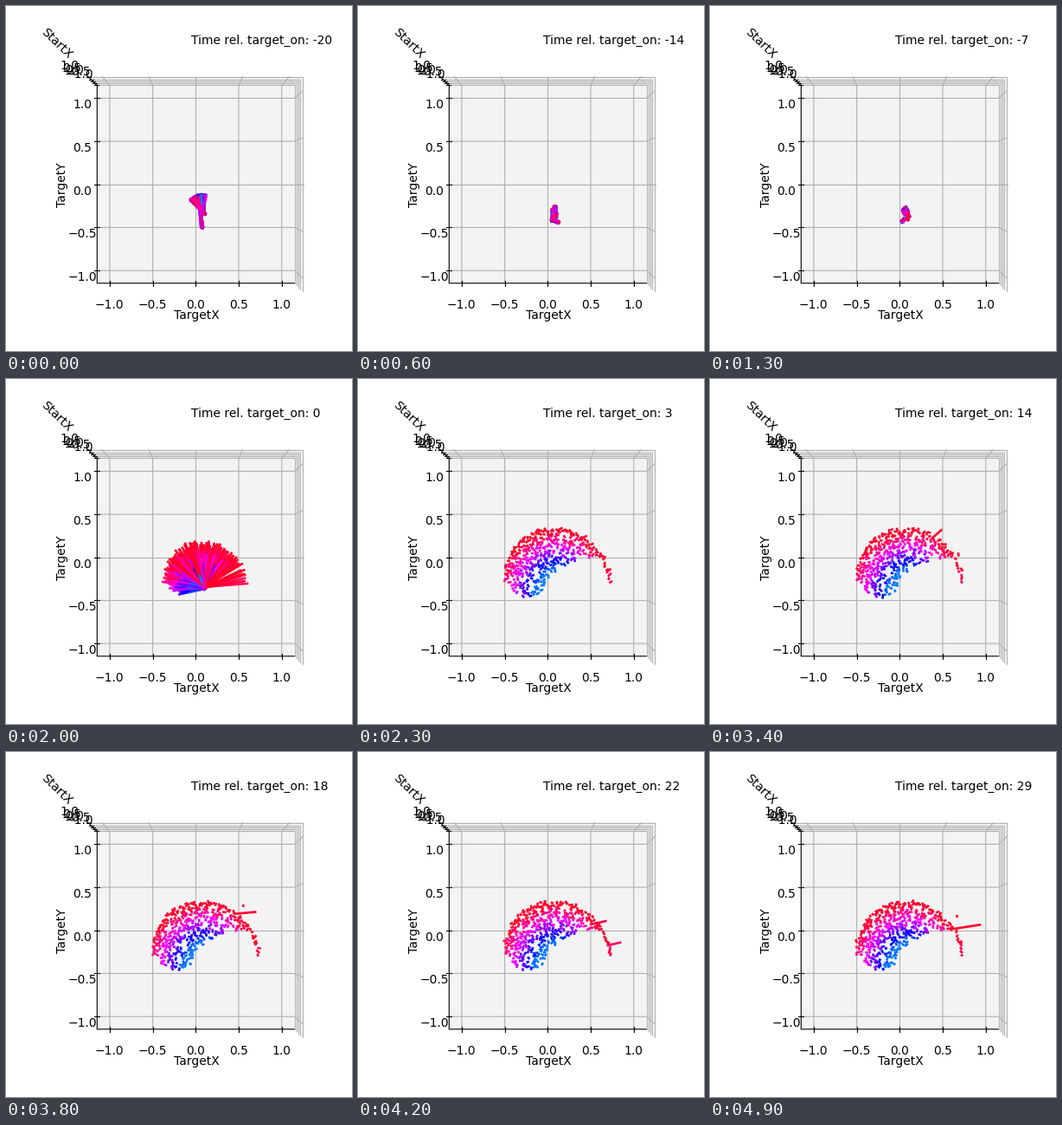
Animation, 400 px wide and 398 px high, one loop 5000 ms. Source, as a matplotlib script:

```python
import numpy as np
import matplotlib.pyplot as plt
from matplotlib.animation import FuncAnimation
from matplotlib.collections import LineCollection
from matplotlib.colors import hsv_to_rgb

W, H, DPI = 400, 398, 100
FRAMES, T0 = 50, -20
CX, CY, HALF, UNIT = 218.8, 205.3, 114, 99.4
E = HALF / UNIT
TICKS = np.linspace(-1, 1, 5)
HOME = np.array([228, 240])
rng = np.random.default_rng(8)

plt.rcParams["font.family"] = "DejaVu Sans"
plt.rcParams["font.size"] = 10
fig = plt.figure(figsize=(W / DPI, H / DPI), dpi=DPI, facecolor="white")
ax = fig.add_axes([0, 0, 1, 1])
ax.set_xlim(-0.5, W - 0.5)
ax.set_ylim(H - 0.5, -0.5)
ax.axis("off")


# ---- perspective box seen from above ----
def project(x, y, z):
    """Data coordinates to stage pixels; z = -E is the far pane."""
    k = UNIT * 10.428 / (10 - 0.374 * z)
    return CX + x * k, CY - y * k


def path(points, color="#b0b0b0", order=1):
    xs, ys = zip(*(project(*p) for p in points))
    ax.plot(xs, ys, color=color, lw=0.8, zorder=order)


def pane(corners, color):
    ax.fill(*zip(*(project(*c) for c in corners)), color=color, lw=0, zorder=0)


def tick(x, y, dx, dy):
    ax.plot([x - dx, x + dx], [y - dy, y + dy], color="black", lw=0.8, zorder=2)


def label(x, y, s, va="center_baseline", **kw):
    ax.text(x, y, s, ha="center", va=va, zorder=5, **kw)


pane([(-E, -E, -E), (E, -E, -E), (E, E, -E), (-E, E, -E)], "#f3f3f3")
pane([(E, -E, -E), (E, E, -E), (E, E, E), (E, -E, E)], "#f9f9f9")
pane([(-E, E, -E), (E, E, -E), (E, E, E), (-E, E, E)], "#f2f2f2")

for v in TICKS:
    path([(v, -E, -E), (v, E, -E), (v, E, E)])
    path([(-E, v, -E), (E, v, -E), (E, v, E)])
    path([(-E, E, v), (E, E, v), (E, -E, v)])

    name = f"{v:.1f}".replace("-", "\u2212")
    px, py = project(v, v, -E)
    tick(px, CY + HALF, 0, 3)
    tick(CX - HALF, py, 3, 0)
    tick(*project(-E, E, v), 2.5, 0)
    label(px - 0.3, 343, name)
    label(87.5, py + 6.2, name)
    label(78.6 - 5.2 * v, 72 - 5 * v, name)
path([(E, -E, -E), (-E, -E, -E), (-E, E, -E), (-E, E, E)], "black", 2)

label(219.5, 357, "TargetX", va="center")
label(64.5, 205.5, "TargetY", va="center", rotation=90)
label(57.8, 43, "StartX", va="center", rotation=-44)
clock = ax.text(214, 43.3, "", ha="left", va="baseline", zorder=5)

# ---- landing spots: a crescent around CENTER ----
CENTER = np.array([231, 234])


def around(center, degrees, radius):
    a = np.radians(degrees)
    return center + np.stack([radius * np.cos(a), -radius * np.sin(a)], axis=-1)


def outer(deg):
    return 62 - 3 * np.sin(np.radians(2 * deg))


def inner(deg):
    taper = np.clip((100 - deg) / 72, 0, 1)
    return 12 + 46 * taper ** 2 + 0.25 * np.maximum(deg - 172, 0)


rim = np.linspace(2, 178, 52) + rng.normal(0, 1, 52)
spots = list(around(CENTER, rim, outer(rim) - rng.uniform(0, 3.5, 52)))
while len(spots) < 335:
    deg, radius = rng.uniform(2, 222), 66 * np.sqrt(rng.random())
    spot = around(CENTER, deg, radius)
    x, y = spot
    inside = (inner(deg) < radius < outer(deg) and y < 250
              and x > 172 + 0.9 * (y - 234))
    if inside and np.hypot(*(np.array(spots) - spot).T).min() > 2.3:
        spots.append(spot)
spots = rng.permutation(np.array(spots))
N = len(spots)

# Hue runs from light blue near the hollow to red at the rim.
reach = (np.hypot(*(spots - (232, 246)).T)
         + 0.12 * np.maximum(spots[:, 0] - 230, 0))
hue = np.clip(210 + 3.3 * (reach - 26) + rng.normal(0, 7, N), 211, 350)
colors = hsv_to_rgb(np.column_stack([hue / 360, np.ones(N), np.ones(N)]))

# ---- positions over time: row r holds time T0 - 1 + r ----
pos = np.empty((FRAMES + 1, N, 2))
times = np.arange(T0 - 1, T0 + FRAMES)
SITES = 6
site = rng.integers(0, SITES, N)
share = {-1: 0, 0: 0.77, 1: 0.97}

for r, t in enumerate(times):
    if t < -1:
        if t == times[0]:
            sites = around(HOME, np.linspace(130, 88, SITES), 22)
        else:
            sites = HOME + (-2, -2) + rng.normal(0, 1, (SITES, 2)) * (2, 3)
            sites[3] += (2, 14) if t == T0 else (0, 7)
        pos[r] = sites[site] + rng.normal(0, 0.7, (N, 2))
    else:
        done = share.get(t, 1) * rng.normal(1, 0.025 if t == 0 else 0.003, (N, 1))
        pos[r] = HOME + done * (spots - HOME) + rng.normal(0, 0.8, (N, 2))

# Some trials on the right glance outward, hold for a moment and return.
right = np.flatnonzero((spots[:, 0] > 250) & (hue > 295))
for i in rng.choice(right, 14, replace=False):
    r = -T0 + rng.integers(4, 14)
    while r < len(times):
        hold = rng.integers(1, 4)
        pos[r:r + hold, i] += around(np.zeros(2), rng.uniform(-5, 45),
                                     rng.exponential(22))
        r += hold + rng.integers(4, 14)

trails = LineCollection([], colors=colors, linewidths=1.9,
                        capstyle="projecting", zorder=4)
ax.add_collection(trails, autolim=False)
trails.set_clip_path(plt.Rectangle((CX - HALF, CY - HALF), 2 * HALF, 2 * HALF,
                                   transform=ax.transData))


def update(n):
    trails.set_segments(np.stack([pos[n], pos[n + 1]], axis=1))
    clock.set_text(f"Time rel. target_on: {T0 + n}")
    return trails, clock


anim = FuncAnimation(fig, update, frames=FRAMES, interval=100,
                     repeat=True, repeat_delay=0)
plt.show()
```
